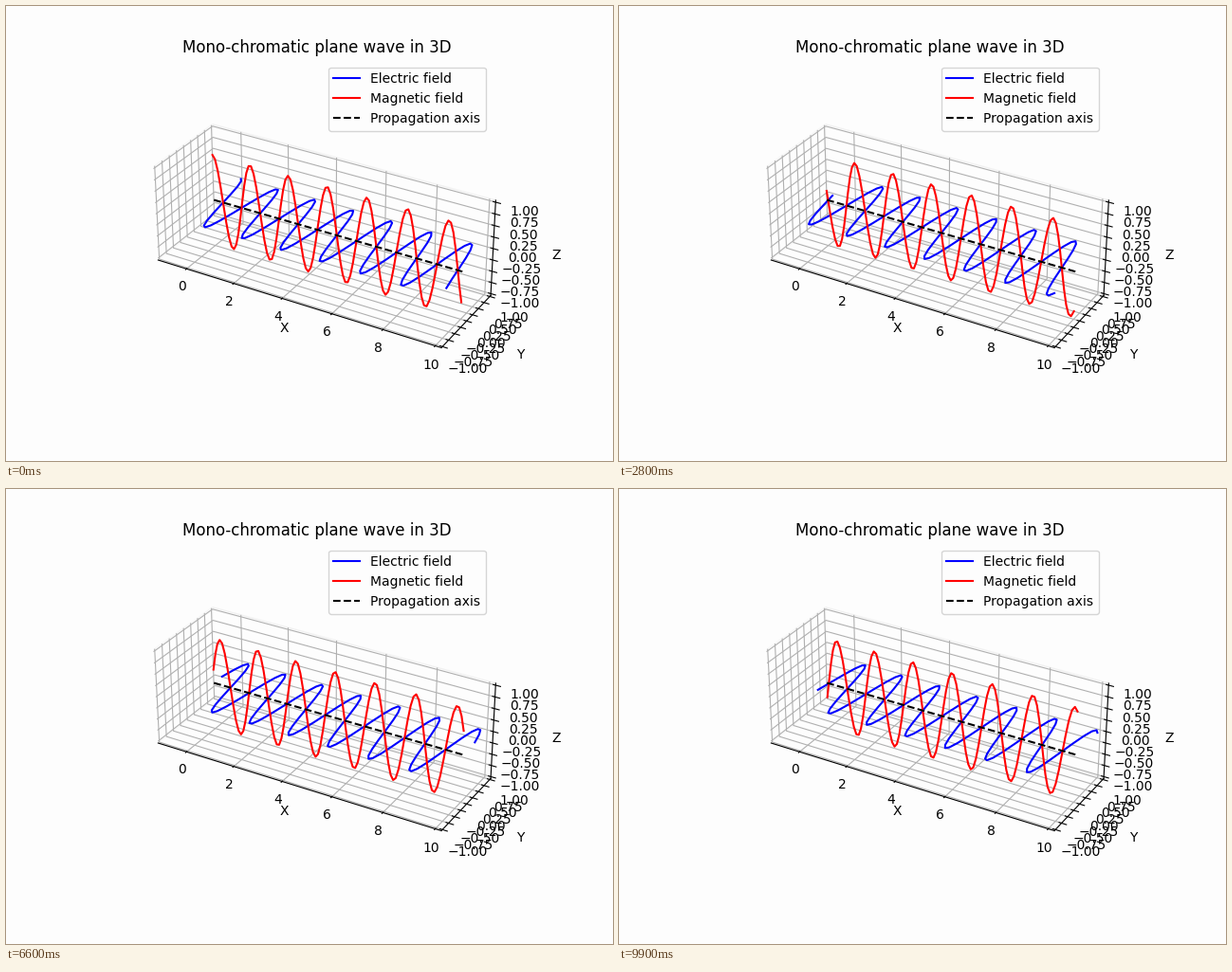
These frames come from a looping animation (640x480 px, 10 s). A matplotlib script:

```python
import numpy as np
import matplotlib.pyplot as plt
from matplotlib.animation import FuncAnimation

FRAMES, INTERVAL = 100, 100
K, STEP = 4, 0.4            # wave number, phase advance per frame
PAPER = "#fdfdfd"

x = np.linspace(0, 10, 100)
zero = np.zeros_like(x)


def padded(lo, hi):
    pad = (hi - lo) / 48
    return lo - pad, hi + pad


fig = plt.figure(figsize=(6.4, 4.8), dpi=100, facecolor=PAPER)
ax = fig.add_subplot(projection="3d", facecolor=PAPER)
ax.set_box_aspect((3, 1, 1))
ax.view_init(elev=30, azim=-60)

electric, = ax.plot(x, zero, zero, "b", label="Electric field")
magnetic, = ax.plot(x, zero, zero, "r", label="Magnetic field")
ax.plot(x, zero, zero, "k--", label="Propagation axis")

ax.set_xlim(*padded(-1, 10))
ax.set_ylim(*padded(-1, 1))
ax.set_zlim(*padded(-1, 1))
ax.set(xlabel="X", ylabel="Y", zlabel="Z",
       title="Mono-chromatic plane wave in 3D")
ax.legend(loc="upper right", facecolor=PAPER)

for axis in (ax.xaxis, ax.yaxis, ax.zaxis):
    axis.pane.set_facecolor(PAPER)


def update(i):
    wave = np.cos(K * x - STEP * i)
    electric.set_data_3d(x, wave, zero)
    magnetic.set_data_3d(x, zero, wave)
    return electric, magnetic


anim = FuncAnimation(fig, update, frames=FRAMES, interval=INTERVAL,
                     repeat=True, repeat_delay=0)
plt.show()
```
